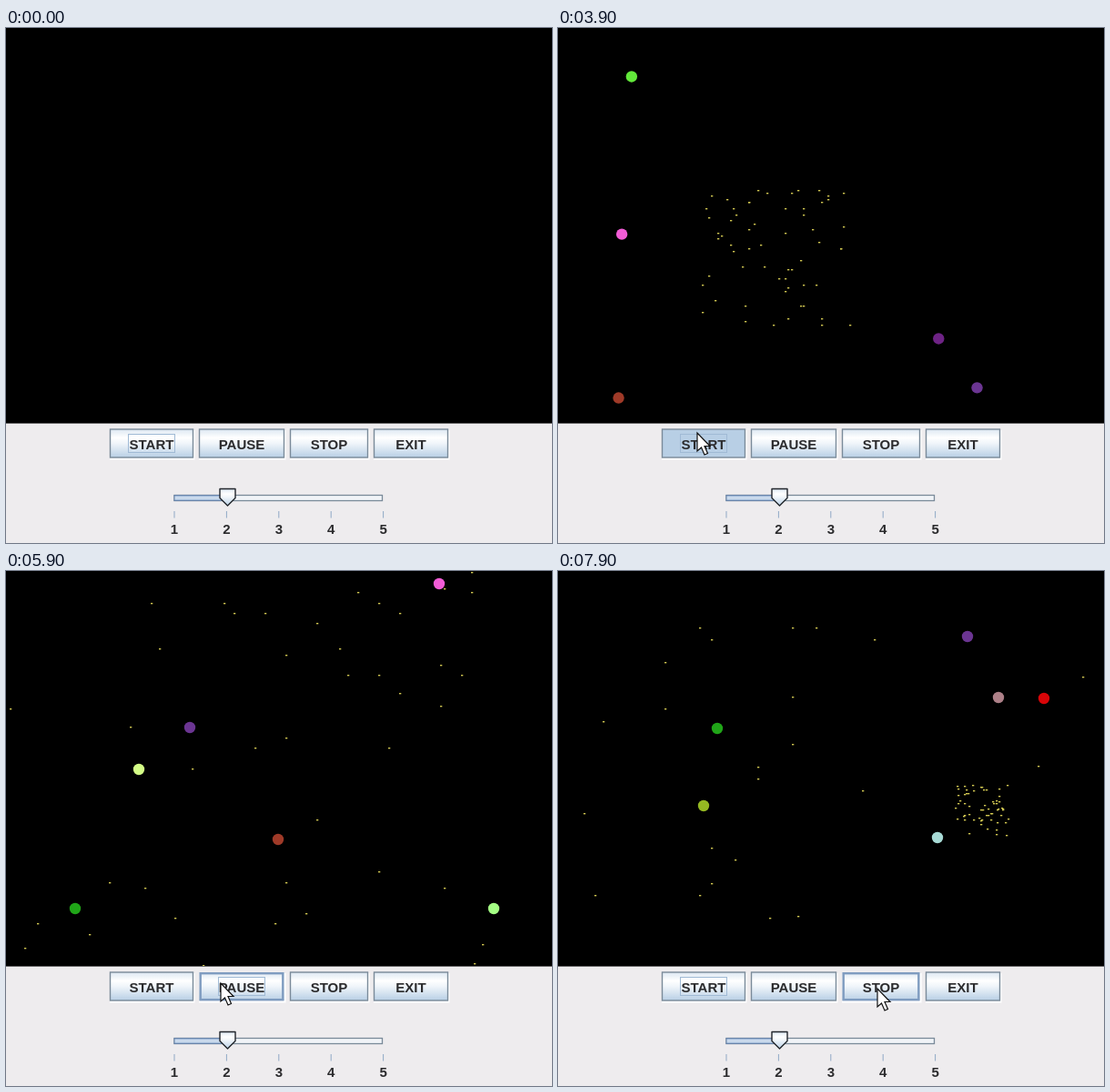
Animation, 600 px wide and 566 px high, one loop 8 s. Source, as an HTML page with a canvas:

```html
<!DOCTYPE html>
<html lang="en">
<head>
<meta charset="utf-8">
<title>Bouncing balls</title>
<style>
  html, body { margin: 0; width: 100%; height: 100%; overflow: hidden; background: #eeecee; }
  canvas, svg { position: absolute; left: 0; top: 0; display: block; }
  text { font: bold 15px "Liberation Sans", Arial, sans-serif; fill: #2b2b2d; text-anchor: middle; }
  .face { fill: url(#metal); stroke: #7a8a99; stroke-width: 1.4; }
  .glow { fill: none; stroke: #7f9cc0; stroke-width: 2.4; visibility: hidden; }
  .ring { fill: none; stroke: #a0bad5; visibility: hidden; }
  .hover .glow, .focus .ring { visibility: visible; }
  .hover .face { stroke: none; }
  .pressed .face { fill: #b8cfe5; stroke: #7a8a99; }
  .pressed .glow { visibility: hidden; }
</style>
</head>
<body>
<canvas id="space" width="600" height="434"></canvas>
<svg width="600" height="566" viewBox="0 0 600 566">
  <defs>
    <linearGradient id="metal" x2="0" y2="1">
      <stop offset="0" stop-color="#dce7f2"/>
      <stop offset=".3" stop-color="#fff"/>
      <stop offset=".5" stop-color="#f0f5fa"/>
      <stop offset="1" stop-color="#b8cfe5"/>
    </linearGradient>
    <linearGradient id="fill" x2="0" y2="1">
      <stop offset="0" stop-color="#8fabd0"/>
      <stop offset=".5" stop-color="#d5e3f2"/>
      <stop offset="1" stop-color="#91add0"/>
    </linearGradient>
  </defs>
  <path d="M0 434.5H600" stroke="#666"/>
  <g id="buttons"></g>
  <rect x="185" y="513.5" width="228.5" height="6" fill="#f1f4f8" stroke="#7a8a99" stroke-width="1.3"/>
  <rect x="185" y="513.5" width="58" height="6" fill="url(#fill)" stroke="#6682a8"/>
  <path d="M235 506.5H252V516.5L243.5 525L235 516.5Z" fill="url(#metal)" stroke="#22262c" stroke-width="1.4" stroke-linejoin="round"/>
  <g id="scale"></g>
  <path id="cursor" d="M0 0V20L4.5 16L8 24L11.5 22.5L8 14.5H14Z" fill="#fff" stroke="#111" stroke-width="1.2"/>
</svg>
<script>
const LOOP = 8000, STEP = 100, PAUSE_AT = 5850, PAUSE_FOR = 250;
const R = 6, W = 600, H = 434, SPARKS = 60, SPREAD = .0112;
const byId = id => document.getElementById(id);
const ctx = byId('space').getContext('2d');

// Balls fly straight between these times, in unfolded space; walls mirror them back.
const KEYS = [3100, 4600, 5850, 6950, 7650];
const ball = (color, born, died, first, ...points) => ({ color, born, died, first, points });
const balls = [
  ball('#f25cd6', 2500, 7540, 0, [228, 312], [-68, 907], [-464, 1686], [-973, 2207], [-660, 2296]),
  ball('#62e83a', 2850, 4835, 0, [363, 270], [-166, -136]),
  ball('#6e2385', 3100, 4835, 0, [54, 134], [737, 523]),
  ball('#9f3a28', 3800, 7540, 1, [150, 394], [299, 295], [373, 220], [485, 270]),
  ball('#6b3592', 3900, LOOP, 1, [227, 196], [-190, -160], [-463, -184], [-726, -60]),
  ball('#20a518', 4200, LOOP, 1, [448, 297], [76, 485], [-386, 808], [-163, 1017]),
  ball('#a4ff84', 4300, 6180, 1, [486, 24], [652, 371], [1339, -316]),
  ball('#d3fc86', 4450, 6510, 1, [543, 268], [146, 638], [99, 451]),
  ball('#ad8088', 6450, LOOP, 3, [37, 238], [484, 139]),
  ball('#d80508', 6650, LOOP, 3, [360, 16], [534, 140]),
  ball('#a8dbd6', 7050, LOOP, 3, [560, 200], [417, 293]),
  ball('#95b922', 7150, LOOP, 3, [40, 180], [160, 258])
];

function random(seed) {
  return () => {
    seed = seed + 0x6d2b79f5 | 0;
    let n = Math.imul(seed ^ seed >>> 15, 1 | seed);
    n = n + Math.imul(n ^ n >>> 7, 61 | n) ^ n;
    return ((n ^ n >>> 14) >>> 0) / 4294967296;
  };
}

const rnd = random(17);
const speed = () => Math.floor(rnd() * 49) - 24;
const burst = (born, x, y) => ({
  born, x, y,
  sparks: Array.from({ length: SPARKS }, () => ({ vx: speed(), vy: speed(), life: 700 + rnd() * 1100 }))
});
const bursts = [
  burst(3600, 240, 255), burst(4380, 153, 118), burst(4835, 285, 228),
  burst(6180, 330, 165), burst(6510, 118, 330), burst(7540, 467, 262)
];

// The pointer rests at each stop and glides to the next, ending at the given time.
const GLIDE = 400;
const stops = [[1700, 235, 396], [2200, 153, 445], [4400, 161, 445], [5500, 236, 453], [6400, 160, 458], [7750, 351, 459]];

const mix = (a, b, k) => a + (b - a) * k;
const ease = k => k * k * (3 - 2 * k);
const simTime = t => t < PAUSE_AT ? t : Math.max(PAUSE_AT, t - PAUSE_FOR);
const wallTime = s => s < PAUSE_AT ? s : s + PAUSE_FOR;

function fold(v, size) {
  const span = size - 2 * R, period = 2 * span;
  const m = ((v - R) % period + period) % period;
  return R + (m > span ? period - m : m);
}

function ballAt({ first, points }, s) {
  let i = 0;
  while (i < points.length - 2 && s > KEYS[first + i + 1]) i++;
  const from = KEYS[first + i], k = (s - from) / (KEYS[first + i + 1] - from);
  const [a, b] = [points[i], points[i + 1]];
  return [fold(mix(a[0], b[0], k), W), fold(mix(a[1], b[1], k), H)];
}

function pointerAt(t) {
  let [, x, y] = stops[0];
  for (const [arrive, toX, toY] of stops) {
    const k = ease(Math.min(1, Math.max(0, 1 - (arrive - t) / GLIDE)));
    x = mix(x, toX, k);
    y = mix(y, toY, k);
  }
  return [x, y];
}

const buttons = [['START', 114, 206], ['PAUSE', 212, 306], ['STOP', 312, 398], ['EXIT', 404, 486]]
  .map(([label, left, right]) => {
    const g = document.createElementNS('http://www.w3.org/2000/svg', 'g');
    const w = right - left, mid = (left + right) / 2;
    g.innerHTML = `
      <path d="M${left} 473.5H${right + .5}V442" fill="none" stroke="#fff" stroke-width="2"/>
      <rect class="face" x="${left + .5}" y="441" width="${w - 1}" height="31"/>
      <rect class="glow" x="${left + 1.7}" y="442.2" width="${w - 3.4}" height="29"/>
      <rect class="ring" x="${mid - 25.5}" y="446.5" width="51" height="20"/>
      <text x="${mid}" y="463">${label}</text>`;
    byId('buttons').append(g);
    return { g, label, left, right };
  });

byId('scale').innerHTML = Array.from({ length: 5 }, (_, i) => {
  const x = 185 + i * 57.4;
  return `<path d="M${x} 531V538.5" stroke="#8fa9c5"/><text x="${x}" y="556">${i + 1}</text>`;
}).join('');

function drawSpace(s) {
  ctx.fillStyle = '#000';
  ctx.fillRect(0, 0, W, H);
  ctx.fillStyle = '#d0c650';
  for (const { born, x, y, sparks } of bursts) {
    const age = s - born;
    if (age < 0) continue;
    for (const { vx, vy, life } of sparks) {
      if (age > life) continue;
      ctx.fillRect(Math.round(x + vx * age * SPREAD) - 1, Math.round(y + vy * age * SPREAD), 2.3, 1.4);
    }
  }
  for (const b of balls) {
    if (s < b.born || s >= b.died) continue;
    ctx.fillStyle = b.color;
    ctx.beginPath();
    ctx.arc(...ballAt(b, s), R + .2, 0, 2 * Math.PI);
    ctx.fill();
  }
}

function drawControls(t) {
  const shown = t >= stops[0][0];
  const [x, y] = pointerAt(t);
  const cursor = byId('cursor');
  cursor.style.visibility = shown ? 'visible' : 'hidden';
  cursor.setAttribute('transform', `translate(${x} ${y})`);
  const justNow = time => t >= time && t < time + STEP;
  const clicks = {
    START: balls.some(b => justNow(wallTime(b.born))),
    PAUSE: justNow(PAUSE_AT - STEP) || justNow(PAUSE_AT + PAUSE_FOR - STEP)
  };
  const focus = t >= PAUSE_AT && t < 6500 ? 'PAUSE' : 'START';
  for (const { g, label, left, right } of buttons) {
    const over = shown && x >= left && x <= right && y >= 441 && y <= 473;
    g.classList.toggle('hover', over);
    g.classList.toggle('pressed', over && !!clicks[label]);
    g.classList.toggle('focus', label === focus);
  }
}

const start = performance.now();
function frame(now) {
  const t = Math.floor(Math.max(0, now - start) % LOOP / STEP) * STEP;
  drawSpace(simTime(t));
  drawControls(t);
  requestAnimationFrame(frame);
}
frame(start);
</script>
</body>
</html>
```
